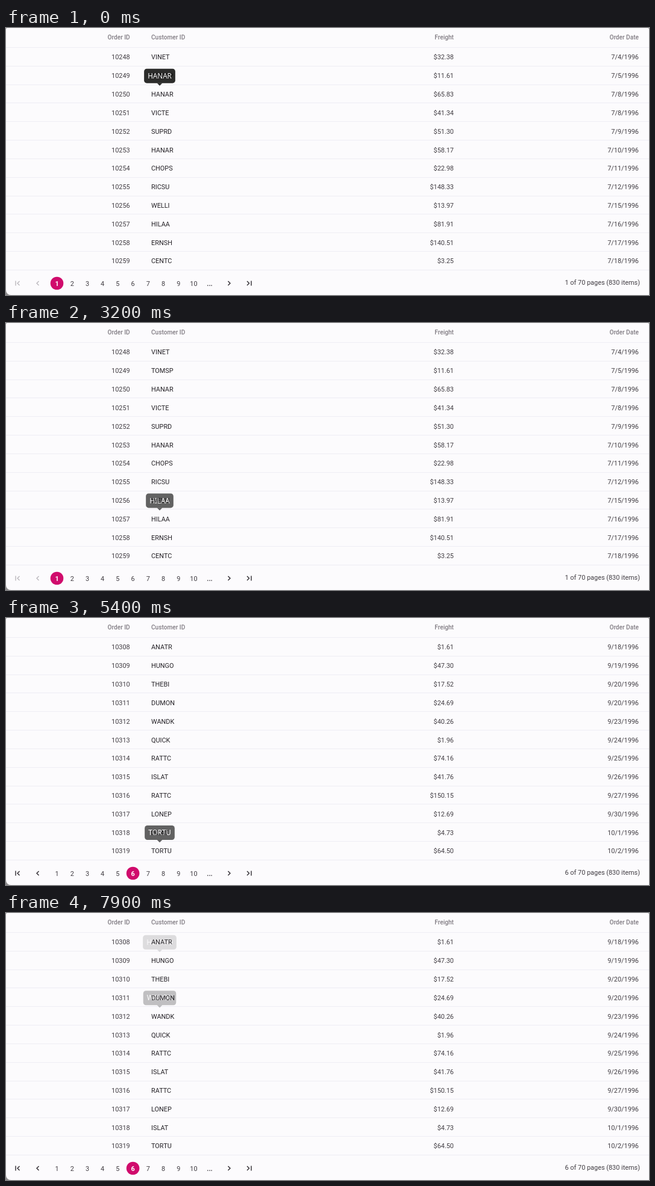
An HTML page for the animation above (8 s loop, 1067x444 px).

```html
<!DOCTYPE html>
<html lang="en">
<head>
<meta charset="utf-8">
<title>Order grid with tooltips</title>
<style>
  html, body { margin: 0; width: 100%; height: 100%; overflow: hidden; background: #8f8d90; }
  svg { display: block; width: 1067px; height: 444px; background: #fcfbfd; border-radius: 2px 2px 0 8px; }
  text { font: 10.9px Roboto, sans-serif; fill: #403c42; }
  .head text { font-size: 10.15px; font-weight: 500; fill: #817c83; }
  .end { text-anchor: end; }
  .mid { text-anchor: middle; }
  .id { fill: #242126; }
  .lines { stroke: #eeedf4; }
  .icon { fill: none; stroke: #2e2a30; stroke-width: 1.4; }
  .off { stroke: #bbb8bd; }
  .current { fill: #fff; font-weight: 700; }
  .tip text { font: 11.7px "Noto Sans", sans-serif; fill: #fff; }
  .tip path, .tip rect { fill: #0e0e0d; }
  .cursor { fill: #fff; stroke: #444; stroke-linejoin: round; }
</style>
</head>
<body>
<svg id="stage" viewBox="0 0 1067 444"></svg>
<script>
const STEP = 30.82, LOOP = 8000, PAGE_CHANGE = 4900;
const FADE_IN = 250, FADE_OUT = 130;

const pages = [
  {
    number: 1, firstId: 10248,
    ids: "VINET TOMSP HANAR VICTE SUPRD HANAR CHOPS RICSU WELLI HILAA ERNSH CENTC",
    freight: "32.38 11.61 65.83 41.34 51.30 58.17 22.98 148.33 13.97 81.91 140.51 3.25",
    dates: "7/4 7/5 7/8 7/8 7/9 7/10 7/11 7/12 7/15 7/16 7/17 7/18"
  },
  {
    number: 6, firstId: 10308,
    ids: "ANATR HUNGO THEBI DUMON WANDK QUICK RATTC ISLAT RATTC LONEP ISLAT TORTU",
    freight: "1.61 47.30 17.52 24.69 40.26 1.96 74.16 41.76 150.15 12.69 4.73 64.50",
    dates: "9/18 9/19 9/20 9/20 9/23 9/24 9/25 9/26 9/27 9/30 10/1 10/2"
  }
];

// page index, row, start of fade-in, start of fade-out
const tips = [
  [0, 2, -217, 1150], [0, 5, 1250, 2950], [0, 9, 3040, 3900],
  [1, 11, 5240, 5870], [1, 7, 6050, 6770], [1, 4, 6850, 7270],
  [1, 8, 7270, 7420], [1, 4, 7370, 7803], [1, 1, 7870, LOOP]
];

const rowY = row => 48.4 + row * STEP;
const pageX = n => 84.5 + (n - 1) * 25.22;
const clamp = v => Math.max(0, Math.min(1, v));
const label = (x, y, text, cls = "") => `<text x="${x}" y="${y}" class="${cls}">${text}</text>`;
const icon = (d, off) => `<path class="icon ${off ? "off" : ""}" d="${d}"/>`;

function rowsMarkup({ ids, freight, dates, firstId }) {
  const cost = freight.split(" "), day = dates.split(" ");
  return ids.split(" ").map((id, i) => {
    const y = rowY(i) + 4;
    return label(205.7, y, firstId + i, "end") + label(241, y, id, "id") +
      label(743, y, "$" + cost[i], "end") + label(1050, y, day[i] + "/1996", "end");
  }).join("");
}

function pagerMarkup({ number }) {
  const first = number === 1;
  let out = icon("M16 420.5v8M22.5 421l-3.5 3.5 3.5 3.5", first) +
    icon("M54.5 421l-3.5 3.5 3.5 3.5", first) +
    icon("M368.5 421l3.5 3.5-3.5 3.5") +
    icon("M400 421l3.5 3.5-3.5 3.5M407 420.5v8") +
    `<circle cx="${pageX(number)}" cy="424.5" r="10.8" fill="#d00b6c"/>`;
  for (let n = 1; n <= 10; n++)
    out += label(pageX(n), 428.5, n, n === number ? "mid current" : "mid");
  return out + `<text x="338" y="428.5" class="mid" style="font-weight:700">...</text>` +
    label(1052, 426.6, number + " of 70 pages (830 items)", "end");
}

function tipMarkup([page, row]) {
  const y = rowY(row);
  return `<g class="tip"><rect y="${y - 42.4}" height="24" rx="4.5"/>
    <path d="M250.5 ${y - 18.6}h9l-4.5 4.5z"/>
    ${label(255, y - 26.2, pages[page].ids.split(" ")[row], "mid")}</g>`;
}

const stage = document.getElementById("stage");
const lines = Array.from({ length: 13 }, (_, i) => `M0 ${Math.round(33 + i * STEP) - 0.5}h1067`).join("");

stage.innerHTML = `
  <path class="lines" d="${lines}"/>
  <g class="head">${label(205.7, 18.8, "Order ID", "end")}${label(241, 18.8, "Customer ID")}
    ${label(743, 18.8, "Freight", "end")}${label(1050, 18.8, "Order Date", "end")}</g>
  ${pages.map(p => `<g class="page">${rowsMarkup(p)}${pagerMarkup(p)}</g>`).join("")}
  ${tips.map(tipMarkup).join("")}
  <path id="arrow" class="cursor" stroke-width=".9"
    d="M245.5 196.5v12l2.8-2.5 2 4.8 2-.9-2-4.7h3.7z"/>
  <g id="click">
    <circle cx="${pageX(6)}" cy="424.5" r="10.5" fill="none" stroke="#aaa6ad"/>
    <circle id="ring" cx="216.7" cy="424" fill="none" stroke="#e8303a" stroke-width="3.6"/>
    <path class="cursor" stroke-width=".9" d="M213.5 432v-7.5q1.4-1.6 2.6 0v4.5q1.3-1 2.3.3 1.3-.7 2.2.5
      1.6-.5 2 .9v4q-.3 2-1.5 4h-5.6l-4-5.5q.2-2 2-1.2z"/>
  </g>`;

const find = id => document.getElementById(id);
const [arrow, click, ring] = ["arrow", "click", "ring"].map(find);
const pageGroups = stage.querySelectorAll(".page");
const tipGroups = stage.querySelectorAll(".tip");
const show = (el, on) => { el.style.display = on ? "" : "none"; };

tipGroups.forEach(g => {
  const width = g.querySelector("text").getComputedTextLength() + 12;
  const box = g.querySelector("rect");
  box.setAttribute("x", 255 - width / 2);
  box.setAttribute("width", width);
});

function draw() {
  const t = performance.now() % LOOP;
  show(pageGroups[0], t < PAGE_CHANGE);
  show(pageGroups[1], t >= PAGE_CHANGE);

  tips.forEach(([, , start, end], i) => {
    const rise = clamp((t - start) / FADE_IN);
    const fall = clamp(1 - (t - end) / FADE_OUT);
    tipGroups[i].style.opacity = Math.min(rise, fall);
  });

  show(arrow, t >= 1800 && t < 2400);
  show(click, t >= 4300 && t < PAGE_CHANGE);
  const spread = (t - 4400) / 350;
  show(ring, spread >= 0 && spread < 1);
  ring.setAttribute("r", 10 + 29 * clamp(spread));
  ring.style.opacity = 1 - 0.6 * clamp(spread);

  requestAnimationFrame(draw);
}
draw();
</script>
</body>
</html>
```
